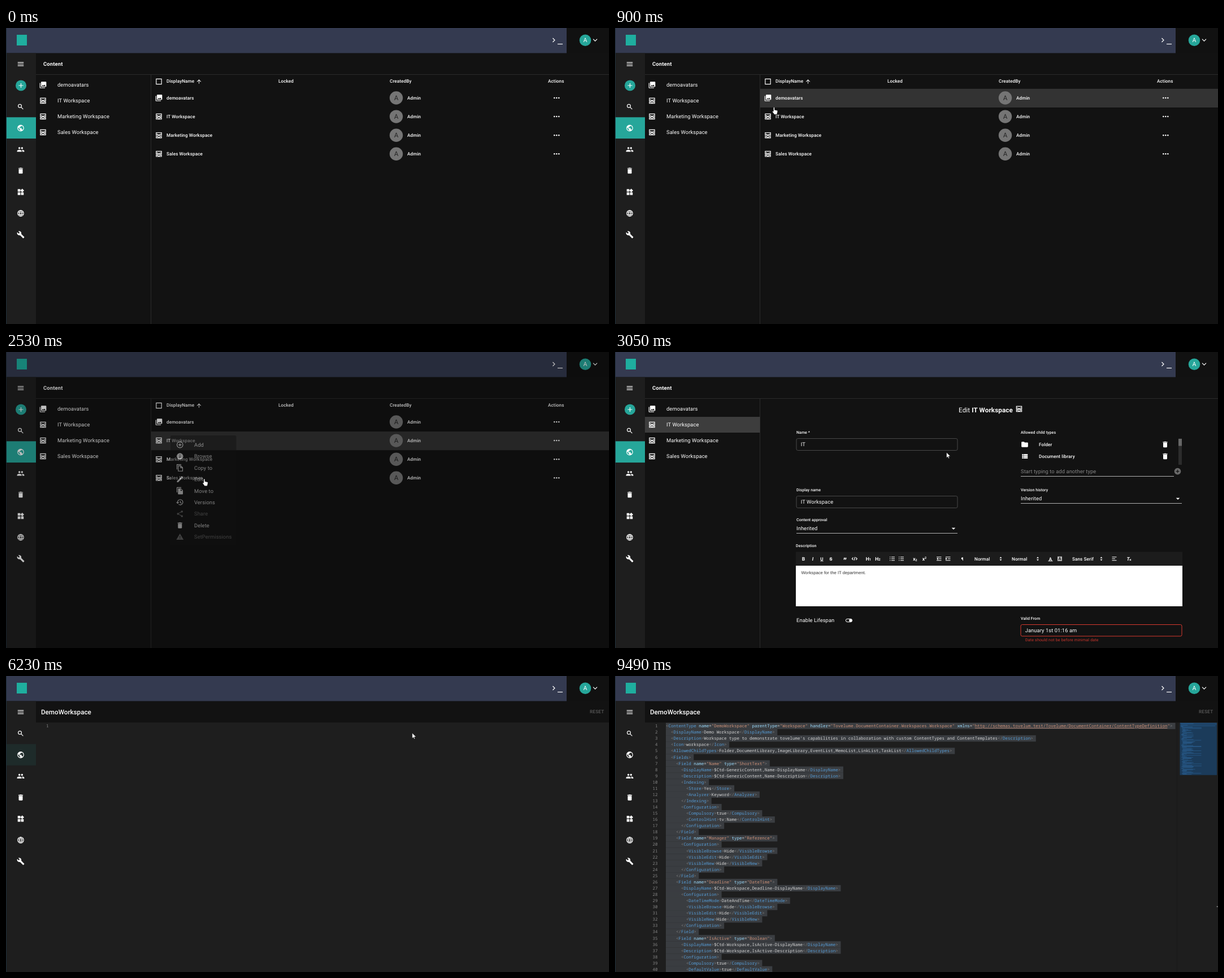
These frames come from a looping animation (1067 px wide and 525 px high, 9560 ms). An HTML page:

```html
<!DOCTYPE html>
<html lang="en">
<head>
<meta charset="utf-8">
<title>Workspace admin</title>
<style>
html, body { margin: 0; width: 100%; height: 100%; overflow: hidden; background: #121212; }
svg { display: block; width: 100vw; height: 100vh; }
text { font-family: Roboto, sans-serif; letter-spacing: .01em; white-space: pre; text-rendering: geometricPrecision; }
.mono text { font-family: "Noto Sans Mono", "DejaVu Sans Mono", monospace; letter-spacing: 0; }
</style>
</head>
<body>
<svg id="stage" viewBox="0 0 1067 525" xmlns="http://www.w3.org/2000/svg"></svg>
<script>
const LOOP = 9560, TEAL = '#26a69a', WHITE = '#fff';

// Icons on a 24 unit grid; a leading ~ means stroked instead of filled
const ICONS = {
  menu: 'M3 18h18v-2H3zM3 13h18v-2H3zM3 6v2h18V6z',
  add: 'M19 13h-6v6h-2v-6H5v-2h6V5h2v6h6z',
  search: '~M14.5 9.5a5 5 0 1 0-10 0a5 5 0 1 0 10 0M13.5 13.5l6 6',
  public: 'M12 2C6.48 2 2 6.48 2 12s4.48 10 10 10 10-4.48 10-10S17.52 2 12 2zm-1 17.93c-3.95-.49-7-3.85-7-7.93 0-.62.08-1.21.21-1.79L9 15v1c0 1.1.9 2 2 2v1.93zm6.9-2.54c-.26-.81-1-1.39-1.9-1.39h-1v-3c0-.55-.45-1-1-1H8v-2h2c.55 0 1-.45 1-1V7h2c1.1 0 2-.9 2-2v-.41c2.93 1.19 5 4.06 5 7.41 0 2.08-.8 3.97-2.1 5.39z',
  people: 'M16 11a3 3 0 1 0 0-6a3 3 0 0 0 0 6zM8 11a3 3 0 1 0 0-6a3 3 0 0 0 0 6zm0 2c-2.33 0-7 1.17-7 3.5V19h14v-2.5c0-2.33-4.67-3.5-7-3.5zm8 0c-.29 0-.62.02-.97.05 1.16.84 1.97 1.97 1.97 3.45V19h6v-2.5c0-2.33-4.67-3.5-7-3.5z',
  trash: 'M6 19c0 1.1.9 2 2 2h8c1.1 0 2-.9 2-2V7H6v12zM19 4h-3.5l-1-1h-5l-1 1H5v2h14V4z',
  widgets: 'M13 13v8h8v-8zM3 21h8v-8H3zM3 3v8h8V3zM16.66 1.69L11 7.34 16.66 13l5.66-5.66z',
  globe: '~M3 12a9 9 0 1 0 18 0a9 9 0 1 0-18 0M12 3c-5 5-5 13 0 18c5-5 5-13 0-18M4 9h16M4 15h16',
  build: 'M22.7 19l-9.1-9.1c.9-2.3.4-5-1.5-6.9-2-2-5-2.4-7.4-1.3L9 6 6 9 1.6 4.7C.4 7.1.9 10.1 2.9 12.1c1.9 1.9 4.6 2.4 6.9 1.5l9.1 9.1c.4.4 1 .4 1.4 0l2.3-2.3c.5-.4.5-1.1.1-1.4z',
  photos: 'M22 16V4c0-1.1-.9-2-2-2H8c-1.1 0-2 .9-2 2v12c0 1.1.9 2 2 2h12c1.1 0 2-.9 2-2zm-11-4l2.03 2.71L16 11l4 5H8l3-4zM2 6v14c0 1.1.9 2 2 2h14v-2H4V6z',
  inbox: '~M4 4h16v9H4zM4 9h5a3 3 0 0 0 6 0h5M4 16h5a3 3 0 0 0 6 0h5v4H4z',
  box: '~M4 4h16v16H4z',
  up: 'M4 12l1.41 1.41L11 7.83V20h2V7.83l5.58 5.59L20 12l-8-8z',
  addRing: '~M3 12a9 9 0 1 0 18 0a9 9 0 1 0-18 0M12 7v10M7 12h10',
  info: 'M12 2a10 10 0 1 0 0 20a10 10 0 0 0 0-20zm1 15h-2v-6h2zm0-8h-2V7h2z',
  copy: '~M16 2H3v15M7 6h7.5l5.5 5.5V22H7zM14 6v6h6',
  move: 'M16 1H4c-1.1 0-2 .9-2 2v14h2V3h12zM15 5l6 6v10c0 1.1-.9 2-2 2H8c-1.1 0-2-.9-2-2V7c0-1.1.9-2 2-2zm-1 7h5.5L14 6.5z',
  edit: 'M3 17.25V21h3.75L17.81 9.94l-3.75-3.75zM20.71 7.04c.39-.39.39-1.02 0-1.41l-2.34-2.34c-.39-.39-1.02-.39-1.41 0l-1.83 1.83 3.75 3.75z',
  history: '~M5 13a8 8 0 1 1 3 5M1.5 11.5L5 15l3.5-3.500M13 8v4.500l4 2.300',
  share: 'M21 5a3 3 0 1 0-6 0l.09.7L8 9.800a3 3 0 1 0 0 4.400l7.150 4.150a3 3 0 1 0 1-1.500L8.900 12.700v-1.400l7.060-4.110A3 3 0 0 0 21 5z',
  warning: 'M1 21h22L12 2zm12-3h-2v-2h2zm0-4h-2v-4h2z',
  folder: 'M10 4H4c-1.1 0-2 .9-2 2v12c0 1.1.9 2 2 2h16c1.1 0 2-.9 2-2V8c0-1.1-.9-2-2-2h-8z',
  list: 'M4 14h4v-4H4zM4 19h4v-4H4zM4 9h4V5H4zM9 14h12v-4H9zM9 19h12v-4H9zM9 5v4h12V5z',
  addDisc: 'M12 2a10 10 0 1 0 0 20a10 10 0 0 0 0-20zm5 11h-4v4h-2v-4H7v-2h4V7h2v4h4z'
};

const rect = (x, y, w, h, fill, more = '') =>
  `<rect x="${x}" y="${y}" width="${w}" height="${h}" fill="${fill}" ${more}/>`;
const circle = (x, y, r, fill) => `<circle cx="${x}" cy="${y}" r="${r}" fill="${fill}"/>`;
const line = (d, color = WHITE, w = 1.2) =>
  `<path d="${d}" fill="none" stroke="${color}" stroke-width="${w}"/>`;
// y is the middle of the capitals
const text = (x, y, s, size = 9.33, fill = WHITE, weight = 400, more = '') =>
  `<text x="${x}" y="${y + size * .355}" font-size="${size}" fill="${fill}" font-weight="${weight}" ${more}>${s}</text>`;
const small = (x, y, s) => text(x, y, s, 8.17, WHITE, 500);
const label = (x, y, s) => text(x, y, s, 7, WHITE, 500);
const mid = 'text-anchor="middle"';
const icon = (name, x, y, color = WHITE, size = 14) => {
  const d = ICONS[name], k = size / 24;
  const paint = d[0] === '~' ? `fill="none" stroke="${color}" stroke-width="2"` : `fill="${color}"`;
  return `<path transform="translate(${x - size / 2} ${y - size / 2}) scale(${k})" d="${d.replace('~', '')}" ${paint}/>`;
};
const group = (id, body, more = '') => `<g id="${id}" ${more}>${body}</g>`;

const FOLDERS = ['demoavatars', 'IT Workspace', 'Marketing Workspace', 'Sales Workspace'];
const folderIcon = i => i ? 'inbox' : 'photos';
const ROW = 33.2, ROW_TOP = 107.8;

const header = () =>
  rect(0, 0, 992, 44.5, '#343a50') + rect(992, 0, 75, 44.5, '#111') +
  rect(19, 12, 18, 19, '#1fae9f') +
  line('M967.5 18l3.5 3.5-3.500 3.500') + line('M976 28.500h9') +
  circle(1025, 21.7, 10.3, TEAL) + text(1025, 21.7, 'A', 10.5, WHITE, 400, mid) +
  line('M1039 19.700l3.500 3.500 3.500-3.500');

const NAV = ['search', 'public', 'people', 'trash', 'widgets', 'globe', 'build'];
const STEP = 37.8;
const nav = top => NAV.map((n, i) => icon(n, 26, top + STEP * i)).join('');

const tree = () => FOLDERS.map((s, i) =>
  icon(folderIcon(i), 65.5, 101 + 28 * i) + text(91, 101 + 28 * i, s)).join('');

const table = () => icon('box', 270.5, 95) + small(284, 94.5, 'DisplayName') + icon('up', 341.5, 95, WHITE, 11) +
  small(482, 94.5, 'Locked') + small(679, 94.5, 'CreatedBy') + small(959, 94.5, 'Actions') +
  FOLDERS.map((s, i) => {
    const y = 124 + 33.1 * i;
    return icon(folderIcon(i), 270.5, y) + small(284, y, s) + circle(690.5, y, 11.7, '#757575') +
      text(690.5, y, 'A', 11.67, '#242424', 400, mid) + small(710, y, 'Admin') +
      [970.3, 974.3, 978.3].map(x => circle(x, y, 1.25, WHITE)).join('');
  }).join('');

const field = (x, y, s, stroke = '#484848', h = 21) =>
  rect(x, y, 285, h, 'none', `rx="2.5" stroke="${stroke}"`) + text(x + 7.7, y + h / 2, s);
const select = (x, y) => text(x, y, 'Inherited') + line(`M${x} ${y + 9}h285`, '#b0b0b0', 1) +
  `<path d="M${x + 274.700} ${y - .8}h6.600l-3.300 3.300z" fill="#fff"/>`;

function toolbar() {
  const y = 366.7;
  const glyph = (x, s, more = '', size = 8.6) => text(x, y, s, size, WHITE, 700, mid + ' ' + more);
  const bars = (x, widths, lead) => widths.map((w, i) => line(`M${x} ${y - 3 + 3 * i}h${w}`, WHITE, 1) +
    (lead ? line(`M${x - 3} ${y - 3 + 3 * i}h1.500`, WHITE, 1) : '')).join('');
  const pick = (x, s, at) => small(x, y, s) +
    `<path d="M${at - 2} ${y - 1}l2-2.500 2 2.500zM${at - 2} ${y + 1}l2 2.500 2-2.500z" fill="#fff"/>`;
  const dent = (x, dir) => bars(x - 4, [8.5], 0) + line(`M${x} ${y}h4.500M${x - 4} ${y + 3}h8.500`, WHITE, 1) +
    `<path d="M${x - 2.500 - dir * 1.500} ${y - 2}l${dir * 3} 2l${-dir * 3} 2z" fill="#fff"/>`;
  return rect(320, 354.5, 684, 25, '#1c1c1c') +
    glyph(333.5, 'B') + glyph(350, 'I', 'font-style="italic"') +
    glyph(366, 'U', 'text-decoration="underline"', 8) + glyph(382, 'S', 'text-decoration="line-through"', 8) +
    text(407, y + 4, '”', 15, WHITE, 900, mid) +
    line(`M421.500 ${y - 2.200}l-2 2.200 2 2.200M426.300 ${y - 2.200}l2 2.200-2 2.200M424.800 ${y - 3}l-1.700 6`) +
    glyph(448.5, 'H<tspan font-size="6">1</tspan>') + glyph(465, 'H<tspan font-size="6">2</tspan>') +
    bars(489, [6, 6, 6], 1) + bars(505, [6, 6, 6], 1) +
    glyph(531, 'x<tspan font-size="5.500" dy="1.500">2</tspan>') + glyph(547.5, 'x<tspan font-size="5.500" dy="-3">2</tspan>') +
    dent(573, -1) + dent(589, 1) + glyph(614.5, '¶', '', 8) +
    pick(636, 'Normal', 682.5) + pick(702, 'Normal', 748) +
    glyph(770.5, 'A', '', 8) + line(`M766.500 ${y + 4}h8`, WHITE, 1) +
    rect(783, y - 4, 8, 8, '#bbb') + text(787, y, 'A', 7.5, '#1c1c1c', 700, mid) +
    pick(809, 'Sans Serif', 860.5) + bars(879.5, [8, 5.5, 8], 0) +
    glyph(908, 'T', 'font-style="italic"') + text(912, y + 2, '×', 7, WHITE, 700, mid);
}

const form = () =>
  text(608, 102.5, 'Edit <tspan font-weight="600">IT Workspace</tspan>', 11.67) + icon('inbox', 715, 101) +
  label(321, 143, 'Name *') + field(321, 153.5, 'IT') +
  label(718, 143, 'Allowed child types') +
  icon('folder', 725, 164) + small(750, 163.7, 'Folder') + icon('trash', 973.5, 164) +
  icon('list', 725, 185) + small(750, 184.7, 'Document library') + icon('trash', 973.5, 185) +
  rect(997, 153.5, 6, 46.5, '#2c2c2c') + rect(997, 154, 6, 12.5, '#686868') +
  text(718, 211.7, 'Start typing to add another type', 9.33, '#858585') + line('M718 220.500h271', '#b0b0b0', 1) +
  icon('addDisc', 995.5, 211.7, '#6a6a6a') +
  label(321, 245, 'Display name') + field(321, 255.5, 'IT Workspace') +
  label(718, 245, 'Version history') + select(718, 259.5) +
  label(321, 298, 'Content approval') + select(321, 312.5) +
  label(320, 343.3, 'Description') + toolbar() + rect(320, 379, 684, 72, WHITE) +
  text(329.5, 391, 'Workspace for the IT department.', 7.7, '#333', 400, 'style="font-family:\'Liberation Sans\',sans-serif;letter-spacing:0"') +
  text(321, 475.5, 'Enable Lifespan') + rect(408.4, 473.4, 11.2, 5.4, 'none', 'rx="2.700" stroke="#fff"') + circle(416.8, 476.1, 2.6, WHITE) +
  label(718, 472.5, 'Valid From') + field(718, 483.5, 'January 1st 01:16 am', '#d8392f', 20.5) +
  text(726, 510.8, 'Date should not be before minimal date', 7, '#cf372d', 400, 'style="letter-spacing:.027em"');

const MENU = [['addRing', 'Add'], ['info', 'Browse'], ['copy', 'Copy to'], ['edit', 'Edit'], ['move', 'Move to'],
  ['history', 'Versions'], ['share', 'Share', 1], ['trash', 'Delete'], ['warning', 'SetPermissions', 1]];
const menu = () => rect(291, 148, 116.5, 195, '#121212', 'rx="2.300"') + MENU.map(([name, s, off], i) => {
  const y = 164.6 + 20.4 * i, color = off ? '#777' : WHITE;
  return icon(name, 307.8, y, color) + text(333, y, s, 9.33, color);
}).join('');

const CODE = `<ContentType name="DemoWorkspace" parentType="Workspace" handler="Tovelume.DocumentContainer.Workspaces.Workspace" xmlns="http://schemas.tovelum.test/Tovelume/DocumentContainer/ContentTypeDefinition">
  <DisplayName>Demo Workspace</DisplayName>
  <Description>Workspace type to demonstrate tovelume's capabilities in collaboration with custom ContentTypes and ContentTemplates</Description>
  <Icon>workspace</Icon>
  <AllowedChildTypes>Folder,DocumentLibrary,ImageLibrary,EventList,MemoList,LinkList,TaskList</AllowedChildTypes>
  <Fields>
    <Field name="Name" type="ShortText">
      <DisplayName>$Ctd-GenericContent,Name-DisplayName</DisplayName>
      <Description>$Ctd-GenericContent,Name-Description</Description>
      <Indexing>
        <Store>Yes</Store>
        <Analyzer>Keyword</Analyzer>
      </Indexing>
      <Configuration>
        <Compulsory>true</Compulsory>
        <ControlHint>tv:Name</ControlHint>
      </Configuration>
    </Field>
    <Field name="Manager" type="Reference">
      <Configuration>
        <VisibleBrowse>Hide</VisibleBrowse>
        <VisibleEdit>Hide</VisibleEdit>
        <VisibleNew>Hide</VisibleNew>
      </Configuration>
    </Field>
    <Field name="Deadline" type="DateTime">
      <DisplayName>$Ctd-Workspace,Deadline-DisplayName</DisplayName>
      <Configuration>
        <DateTimeMode>DateAndTime</DateTimeMode>
        <VisibleBrowse>Hide</VisibleBrowse>
        <VisibleEdit>Hide</VisibleEdit>
        <VisibleNew>Hide</VisibleNew>
      </Configuration>
    </Field>
    <Field name="IsActive" type="Boolean">
      <DisplayName>$Ctd-Workspace,IsActive-DisplayName</DisplayName>
      <Description>$Ctd-Workspace,IsActive-Description</Description>
      <Configuration>
        <Compulsory>true</Compulsory>
        <DefaultValue>true</DefaultValue>`.split('\n');
const CH = 4.485, LH = 11.07, MONO = CH / .6;

const span = (color, s, more = '') => `<tspan fill="${color}" ${more}>${s.replace(/</g, '&lt;')}</tspan>`;
const paint = s => s.replace(/(<\/?)(\w+)|( )(\w+)="([^"]*)"|(>)|([^<>]+)/g, (m, open, tag, gap, attr, value, close, plain) =>
  open ? span('#808080', open) + span('#569cd6', tag) :
  attr ? gap + span('#9cdcfe', attr) + span('#d4d4d4', '=') + span('#ce9178', '"') +
    span('#ce9178', value, value.startsWith('http') ? 'text-decoration="underline"' : '') + span('#ce9178', '"') :
  close ? span('#808080', '>') : span('#d4d4d4', plain));
const lineY = i => 88.5 + LH * i;
const lineNo = i => text(75.5, lineY(i), i + 1, MONO, '#858585', 400, 'text-anchor="end"');

function code() {
  let out = '';
  CODE.forEach((s, i) => {
    const indent = s.search(/\S/);
    out += rect(90, 83 + LH * i, (s.length + 1) * CH, LH + .1, '#3a3d41') + (i ? lineNo(i) : '') +
      text(90 + indent * CH, lineY(i), paint(s.trim()), MONO);
  });
  // minimap
  out += rect(994, 83, 1, 442, '#191919') + rect(999.5, 83, 65.5, 92.7, '#1b3b5a');
  for (let i = 0; i < 79; i++) {
    const s = CODE[i < 40 ? i : 6 + i * 11 % 34], indent = s.search(/\S/) * .55;
    out += rect(1000 + indent, 83.3 + 1.166 * i, Math.min(s.trim().length * .55, 65 - indent), .7, '#2f6da6', 'opacity=".7"');
  }
  return out + rect(1064.5, 408.3, 2.5, 1.4, '#8a8a8a');
}

const CURSORS = {
  arrow: 'M0 0v9.800l2.200-2.100 1.500 3.300 1.500-.7-1.400-3.200h3.200z',
  hand: 'M-1.200 6.500V1a1.100 1.100 0 0 1 2.200 0v3.500l4 .9c1 .2 1.400.8 1.300 1.700l-.6 3.300-.9 2.300H.500L-2.800 8.300c-.8-1.200.4-2.200 1.600-1z',
  beam: 'M-2.300-6.500h1.800l.5.500.5-.5h1.800M0-6v12M-2.300 6.500h1.800l.5-.5.5.5h1.800'
};

const stage = document.getElementById('stage');
stage.innerHTML = rect(0, 0, 1067, 525, '#121212') + header() + rect(0, 44.5, 53, 481, '#1e1e1e') +
  icon('menu', 26, 64) +
  group('browse',
    rect(0, 158.3, 53, 37.8, TEAL) + circle(26.5, 102, 9.5, TEAL) + icon('add', 26.5, 102) + nav(139.7) +
    text(66, 63.3, 'Content', 9.33, WHITE, 600, 'style="letter-spacing:.02em"') +
    line('M53 82.500h1014M256.500 83v442', '#2b2b2b', 1) + rect(53, 115, 203.5, 28, '#3d3d3d', 'id="picked"') + tree()) +
  group('list', rect(257, 0, 810, ROW, '#333', 'id="hover"') + table()) +
  group('form', form()) +
  group('editor',
    rect(0, 120.8, 53, 37.8, TEAL, 'id="fade"') + nav(102) + rect(53, 82.5, 1014, 443, '#1e1e1e') +
    text(62, 64, 'DemoWorkspace', 11.67, WHITE, 500, 'style="letter-spacing:0"') +
    text(1033, 63.5, 'RESET', 8.17, '#5c5c5c', 500, 'style="letter-spacing:.028em"') +
    `<g class="mono">${group('code', code())}${lineNo(0)}</g>`) +
  rect(0, 0, 1, 525, '#1d2c38') +
  rect(0, 0, 1067, 525, '#000', 'id="shade"') + group('menu', menu()) +
  group('tip', rect(724.5, 109.5, 95, 14, '#2b2b2b', 'stroke="#8a8a8a"') +
    text(728.5, 116.4, 'Open DemoWorkspace CTD', 7, '#e4e4e4', 400, 'style="font-family:\'Open Sans\',sans-serif;letter-spacing:-.012em"')) +
  '<path id="cursor" stroke-linejoin="round"/>';

const $ = id => document.getElementById(id);
const show = (id, on) => $(id).setAttribute('visibility', on ? 'visible' : 'hidden');
const clamp = v => Math.max(0, Math.min(1, v));
const smooth = p => p * p * (3 - 2 * p);
const ramp = (t, a, b) => smooth(clamp((t - a) / (b - a)));

// Pointer stops: time, x, y
const TRACK = [[180, 430, 477], [720, 279, 128], [870, 279, 128], [900, 281.5, 140.7], [1150, 297.5, 154.5], [1580, 297.5, 154.5],
  [1810, 334, 180], [1900, 334, 180], [2220, 351, 225], [2660, 351, 225], [3050, 586.5, 178], [3380, 691, 92],
  [3770, 717.5, 101], [5840, 717.5, 101], [6050, 718.7, 101], [7000, 718.7, 101], [7250, 640, 115], [7460, 400, 100],
  [7640, 163, 84], [7720, 186, 79], [7840, 186, 79], [7870, 179, 74], [7930, 179, 74], [7960, 186, 79],
  [8110, 186, 79], [8680, 932, 477], [8710, 960, 530]];

function pointer(t) {
  const n = TRACK.findIndex(k => k[0] > t);
  if (n < 1) return null;
  const [t0, x0, y0] = TRACK[n - 1], [t1, x1, y1] = TRACK[n], p = smooth((t - t0) / (t1 - t0));
  return { x: x0 + (x1 - x0) * p, y: y0 + (y1 - y0) * p };
}

function pose(t) {
  const inList = t < 2760, inEditor = t >= 6050, at = pointer(t);
  show('browse', !inEditor);
  show('picked', !inList && !inEditor);
  show('list', inList);
  show('form', !inList && !inEditor);
  show('editor', inEditor);
  show('fade', inEditor && t < 6320);
  $('fade').setAttribute('opacity', .5 * (1 - ramp(t, 6050, 6300)));
  show('code', t >= 6320);

  const row = t >= 1340 ? 1 : at ? Math.floor((at.y - ROW_TOP) / ROW) : -1;
  const onRow = inList && row >= 0 && row < 4;
  show('hover', onRow);
  $('hover').setAttribute('y', ROW_TOP + ROW * row);

  const open = ramp(t, 1340, 1565) * (1 - ramp(t, 2430, 2625)), grow = ramp(t, 1340, 1490);
  show('shade', open > 0);
  $('shade').setAttribute('opacity', open * .52);
  show('menu', open > 0);
  $('menu').setAttribute('opacity', open);
  $('menu').setAttribute('transform',
    `translate(291 148) scale(${.75 + .25 * grow} ${.5625 + .4375 * grow}) translate(-291 -148)`);

  const tip = ramp(t, 4060, 4220);
  show('tip', tip > 0 && t < 5860);
  $('tip').setAttribute('opacity', tip);

  show('cursor', at);
  if (!at) return;
  const onIcon = !inList && !inEditor && at.x > 708 && at.y > 95 && at.y < 109;
  const kind = onRow || onIcon ? 'hand' : t > 7000 && at.y > 83 ? 'beam' : 'arrow', beam = kind === 'beam';
  const c = $('cursor');
  c.setAttribute('d', CURSORS[kind]);
  c.setAttribute('fill', beam ? 'none' : WHITE);
  c.setAttribute('stroke', beam ? WHITE : '#000');
  c.setAttribute('stroke-width', beam ? .9 : .6);
  c.setAttribute('transform', `translate(${at.x} ${at.y})`);
}

const start = performance.now();
function tick() {
  pose((performance.now() - start) % LOOP);
  requestAnimationFrame(tick);
}
tick();
</script>
</body>
</html>
```
